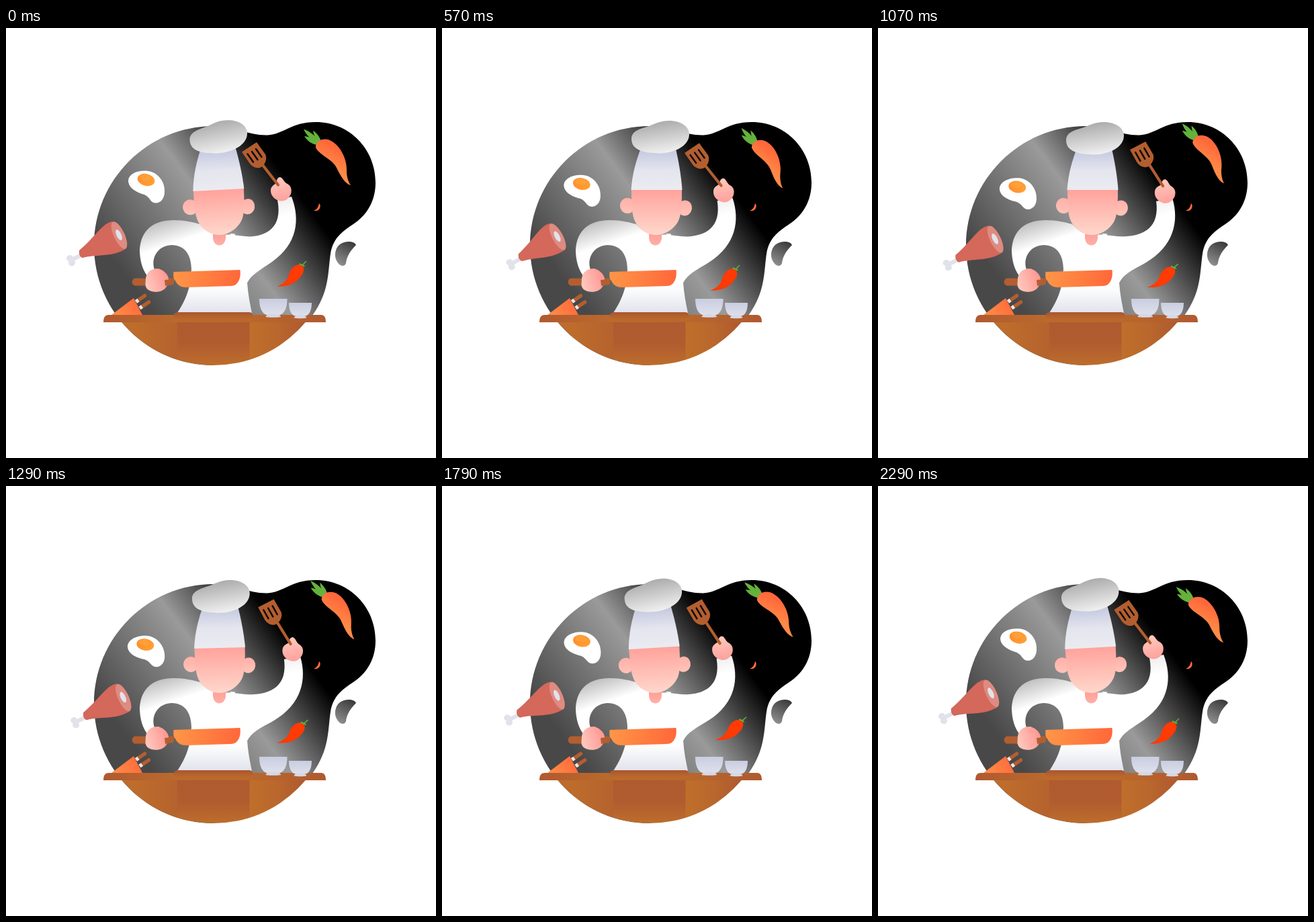
An HTML page with a canvas that plays this animation: 640 by 640 pixels, repeating every 2370 ms.

```html
<!DOCTYPE html>
<html lang="en">
<head>
<meta charset="utf-8">
<title>Cooking</title>
<style>
html, body { margin: 0; width: 100%; height: 100%; overflow: hidden; background: #fff; }
canvas { display: block; width: 640px; height: 640px; }
</style>
</head>
<body>
<canvas id="stage" width="640" height="640"></canvas>
<script>
const ctx = document.getElementById('stage').getContext('2d');
const LOOP = 2370, STEPS = 33, STEP = 71.3;
const TIMES = [0, 290, 570, 1070, 1500, 1790, 2290];
const BROWN = '#b35e30';

// Pose values at TIMES, joined by a cyclic spline.
const pose = {
  head: [-3, -0.4, 0, 0, -3, -3.6, -3.2],
  puffX: [-1.5, -2, 0, -2, -1.5, -2, -1.5],
  puffY: [0, 0, 0, 2, 2.2, 0.8, 0],
  hand: [0, 3, 10, 18, 15, 8, 0],
  spatula: [0, -1.7, -0.6, 5.5, 6, 4.4, 0.2],
  meatX: [0, 1, 3.6, 6.2, 5.5, 2.7, 0],
  meatY: [0, 0.2, 2.3, 6, 6, 3.6, 0.2],
  meatTurn: [0, -3, -3, -0.8, 1, 1, 0.2],
  eggY: [0, 1.5, 6, 10.5, 8.5, 4.5, -0.5],
  eggTurn: [0, 0, -2, -4, -5, -3, 0],
  carrotX: [478, 476, 476.5, 484, 487, 486.5, 479],
  carrotY: [192.5, 195, 194, 187, 183.5, 184.5, 192],
  carrotTurn: [0, 3.4, 5.4, 4.9, 0.8, -1.9, -0.4],
  chiliX: [425.5, 422, 421.5, 424, 429, 430, 426.5],
  chiliY: [366, 371, 372, 368.5, 362, 361, 365],
  chiliTurn: [0, -0.5, 0, 4.2, 5, 5, 0]
};

function at(keys, t) {
  const n = TIMES.length;
  const wrap = i => ((i % n) + n) % n;
  const v = i => keys[wrap(i)];
  const time = i => TIMES[wrap(i)] + Math.floor(i / n) * LOOP;
  const slope = i => (v(i + 1) - v(i - 1)) / (time(i + 1) - time(i - 1));
  let i = n - 1;
  while (TIMES[i] > t) i--;
  const d = time(i + 1) - time(i), s = (t - time(i)) / d, s2 = s * s, s3 = s2 * s;
  return (2 * s3 - 3 * s2 + 1) * v(i) + (s3 - 2 * s2 + s) * d * slope(i) +
    (3 * s2 - 2 * s3) * v(i + 1) + (s3 - s2) * d * slope(i + 1);
}

function grad(x0, y0, x1, y1, ...stops) {
  const g = ctx.createLinearGradient(x0, y0, x1, y1);
  stops.forEach((s, i) => Array.isArray(s)
    ? g.addColorStop(s[0], s[1])
    : g.addColorStop(i / (stops.length - 1), s));
  return g;
}

function shape(d, fill) {
  ctx.fillStyle = fill;
  ctx.fill(new Path2D(d));
}

function line(d, color, width, cap = 'round') {
  ctx.strokeStyle = color;
  ctx.lineWidth = width;
  ctx.lineCap = cap;
  ctx.stroke(new Path2D(d));
}

function oval(x, y, rx, ry, turn, fill) {
  ctx.beginPath();
  ctx.ellipse(x, y, rx, ry, turn * Math.PI / 180, 0, 7);
  ctx.fillStyle = fill;
  ctx.fill();
}

// Draw with a turn about (x, y), then a shift.
function moved(x, y, turn, dx, dy, draw) {
  ctx.save();
  ctx.translate(x + dx, y + dy);
  ctx.rotate(turn * Math.PI / 180);
  ctx.translate(-x, -y);
  draw();
  ctx.restore();
}

function backdrop() {
  shape('M309 146C345 147 360 160 389 159.500C414 158 424 140 461 140C511 140 550 180 550 230C550 258 537 277 521 289C504 301 487 310 483 336C479 362 482 392 456 428L309 502C211 502 131 422 131 324C131 226 211 146 309 146Z',
    grad(-64, 48, 160, -120, [0, '#484848'], [0.58, '#9a9a9a'], [1, '#000']));
  shape('M521 323C519 317 505 316 497 322C489 328 488 341 493 348C497 355 504 356 506 350C507 341 511 333 521 323Z',
    grad(514, 318, 496, 352, '#3a3a3a', '#8e8e8e'));
  shape('M466 261C470 264 467 274 458 272C463 270 465 266 466 261Z', '#ff6d3c');
}

function table() {
  ctx.save();
  ctx.beginPath();
  ctx.arc(309, 324, 178, 0, 7);
  ctx.clip();
  ctx.fillStyle = grad(195, 0, 265, 0, '#bd6c2c', '#b4612e');
  ctx.fillRect(120, 432, 136, 72);
  ctx.fillStyle = grad(0, 438, 0, 502, '#b05a30', '#b15c2f', '#bd6d2c');
  ctx.fillRect(255, 432, 108, 72);
  ctx.fillStyle = grad(363, 0, 447, 0, '#bf6f2b', '#b9672d', '#ae582f');
  ctx.fillRect(362.500, 432, 120, 72);
  ctx.restore();
  shape('M145 438C145 431 147 427 153 427H469C474 427 476 431 476 438Z',
    grad(145, 0, 476, 0, '#b05a30', '#bb6a2c', '#b9672c', '#b05a30'));
  shape('M249 434.500C249 427 251 423 256 423H362C367 423 368 427 368 434.500Z',
    grad(0, 423, 0, 435, '#aa5630', '#bd6c2c'));
}

function wedge() {
  line('M197 405L206.500 398.500M202 415L212.500 408', BROWN, 5.500);
  line('M193.500 407.500L197 405M199 417L202.500 414.500', '#f1e6e2', 5.500, 'butt');
  shape('M157 427L190 402L203 427Z', grad(160, 427, 196, 405, '#ff8d47', '#ff6a3b'));
}

function bowl(x, y, w, h) {
  const r = x + w, m = x + w / 2, b = y + h;
  const fill = grad(0, y, 0, b + 4, '#c9cde0', '#e2e4ee');
  shape(`M${x} ${y}H${r}C${r} ${y + h * 0.72} ${m + w * 0.34} ${b} ${m + w * 0.2} ${b}H${m - w * 0.2}C${m - w * 0.34} ${b} ${x} ${y + h * 0.72} ${x} ${y}Z`, fill);
  shape(`M${m - w * 0.27} ${b + 3}C${m - w * 0.27} ${b - 3} ${m + w * 0.27} ${b - 3} ${m + w * 0.27} ${b + 3}C${m + w * 0.2} ${b + 4} ${m - w * 0.2} ${b + 4} ${m - w * 0.27} ${b + 3}Z`, '#d5d8e6');
}

function arm(h) {
  const p = (x, y, kx, ky) => `${x + kx * h} ${y + ky * h} `;
  shape('M330 309L338 309C' + p(376, 315, 0.6, 0) + p(414, 306, 0.35, -0.1) + p(404, 256, 0.56, 0.1) +
    'L' + p(425, 251, 0.75, 0.2) + 'C' + p(438, 285, 0.55, 0.1) + p(434, 321, 0.4, 0.2) + p(396, 348, 0.1, 0.1) +
    'C379 360 366 366 359 379L320 379Z',
    grad(412, 250, 416, 280, '#ececec', '#fff'));
}

function torso() {
  const d = 'M289 292C300 304 310 308 318 308C326 308 333 307 338 308L365 311L365 368L359 379C360 395 363 410 366 424H255C264 410 270 398 274 380L276 360C276 340 268 323 246 323C225 324 214 344 222 362L213 372C203 362 199 345 199 330C201 300 220 286 250 286C265 286 278 289 289 292Z';
  shape(d, grad(0, 385, 0, 424, '#fff', '#e1e3ec'));
  shape(d, grad(240, 284, 252, 320, 'rgba(0,0,0,.25)', 'rgba(0,0,0,0)'));
  shape('M333 306L341 306.500L340 311Z', '#fff');
  shape('M308 300H327V313C326 320 322 323.500 317.500 323.500C313 323.500 309 320 308 313Z',
    grad(0, 305, 0, 324, '#ff9f98', '#ffb0a6'));
}

function head(t) {
  const skin = grad(0, 241, 0, 306, '#ffa39c', '#ffd6ca');
  moved(317, 300, at(pose.head, t), 0, 0, () => {
    oval(276, 264.500, 11, 11.500, -8, grad(0, 253, 0, 276, '#ffb0a8', '#ffc3b8'));
    oval(361.500, 268, 10.500, 11.500, 10, grad(0, 256, 0, 280, '#ffb0a8', '#ffc5ba'));
    shape('M282 240H357C357 268 356 284 348 293C341 302 329 308 319 308C307 308 296 302 289 291C282 280 282 262 282 240Z', skin);
    shape('M297 176H347C352 196 356 220 357.500 241H281.500C283 217 289 197 297 176Z',
      grad(0, 183, 0, 241, '#c6cae0', '#e4e5ee', '#ebebf1'));
    moved(325, 162, 0, at(pose.puffX, t), at(pose.puffY, t), () =>
      shape('M282 165C282 153 295 150 308 146C318 142 326 138 338 138C356 138 368 147 368 158C368 176 345 186.500 323 186.500C303 186 282 183 282 165Z',
        grad(320, 140, 327, 187, '#acacac', '#f1f1f1')));
  });
}

function pan() {
  shape('M193 372.500H249V382L237 383.500H193C186 383.500 186 372.500 193 372.500Z', BROWN);
  shape('M208 373C209 363 217 358 226 358C232 359 241 365 242 373C242 382 238 391 227 392.500C217 394 207 390 207.500 381Z',
    grad(208, 382, 243, 370, '#ffc9be', '#ff938f'));
  shape('M236 375L250 373.500V380L237 384Z', BROWN);
  shape('M249.500 363L348.500 360C349 366 349 370 347 375C344 381 341 384 334 384L268 386C259 386 254 381 252 376C249 374 249 369 249.500 363Z',
    grad(249, 0, 349, 0, '#ff9647', '#ff673a'));
}

function rightHand(t) {
  const h = at(pose.hand, t);
  arm(h);
  moved(409, 240, h * 0.3, h, h * 0.18, () =>
    shape('M402 231C403 226 404 222 408 222C412 223 413 228 417 231C424 234 426 240 424 247C421 254 416 258 409 257.500C399 256 394 249 394 242C394 236 398 234 402 231Z',
      grad(405, 224, 414, 258, '#ffc8bd', '#ff9f99')));
  moved(406, 235, at(pose.spatula, t), h * 1.05, h * 0.1, () => {
    line('M382 204L405 233.500', BROWN, 4.200);
    shape('M351 184.500L373 170L386 188C389 194 386 203 380 207C374 210 367 207 363 202Z', BROWN);
    line('M359.500 187.500L368 199.500M366 184L374.500 196M372 180L380.500 192', '#0b0503', 2.400);
  });
}

function egg(t) {
  moved(209, 226, at(pose.eggTurn, t), -at(pose.eggY, t) * 0.12, at(pose.eggY, t), () => {
    shape('M182 227C183 216 198 211 212 213C226 215 237 229 236 244C236 254 230 260.500 223 260.500C214 260 215 252 206 248C196 245 182 239 182 227Z', '#fff');
    oval(208.500, 226, 13, 8.800, 14, grad(196, 220, 221, 234, '#ff8d2c', '#ffa136'));
    oval(207, 222.500, 8, 4.500, 8, 'rgba(255,175,70,.4)');
  });
}

function meat(t) {
  moved(168, 310, at(pose.meatTurn, t), at(pose.meatX, t), at(pose.meatY, t), () => {
    const bone = '#e1e2ea';
    line('M98 345L116 336', bone, 6);
    oval(95, 342.500, 5, 4.500, -20, bone);
    oval(98, 349.500, 5, 4.800, 0, bone);
    shape('M159 288C143 290 134 310 109 331C108 336 110 341 114 342C136 336 158 342 179 328Z', '#d3685b');
    oval(168.500, 308.500, 8, 22, -25, '#de8b81');
    oval(168, 308, 3.600, 8.600, -25, bone);
  });
}

function carrot(t) {
  moved(478, 192.500, at(pose.carrotTurn, t), at(pose.carrotX, t) - 478, at(pose.carrotY, t) - 192.500, () => {
    const green = '#64b23d';
    shape('M443 150.500C453 154 461 161 468 171L465 173C455 167 447 160 443 150.500Z', green);
    shape('M444 161C453 162 461 166 468 172L465 174.500C456 173 449 169 444 161Z', green);
    shape('M457 152.500C463 157 467 162 469 169L466 171C461 166 458 160 457 152.500Z', green);
    shape('M461 178C460 169 470 163 481 166.500C497 173 508 195 507 213C507 222 510 230 513 234C505 232 499 222 493 210C487 195 467 190 461 178Z',
      grad(492, 178, 478, 204, '#ff683a', '#ff8a47'));
  });
}

function chili(t) {
  moved(425.500, 366, at(pose.chiliTurn, t), at(pose.chiliX, t) - 425.500, at(pose.chiliY, t) - 366, () => {
    shape('M403.500 385C411 381 418 378 421 367C424 355 434 350 440 353C446 357 443 366 436 373C429 381 418 385 403.500 385Z', '#ff3a04');
    line('M441 353L446.500 347.500', '#5bb03a', 1.600);
    line('M437.500 351.500L443.500 354', '#5bb03a', 2.200);
  });
}

function render(t) {
  ctx.fillStyle = '#fff';
  ctx.fillRect(0, 0, 640, 640);
  backdrop();
  egg(t);
  meat(t);
  carrot(t);
  chili(t);
  rightHand(t);
  torso();
  head(t);
  pan();
  wedge();
  table();
  bowl(377, 403, 41.500, 24);
  bowl(421, 409, 34, 19.500);
}

function frame() {
  const t = performance.now() % LOOP;
  const step = Math.min(STEPS - 1, Math.floor((t + 6) / STEP));
  render(step * STEP);
  requestAnimationFrame(frame);
}
frame();
</script>
</body>
</html>
```
